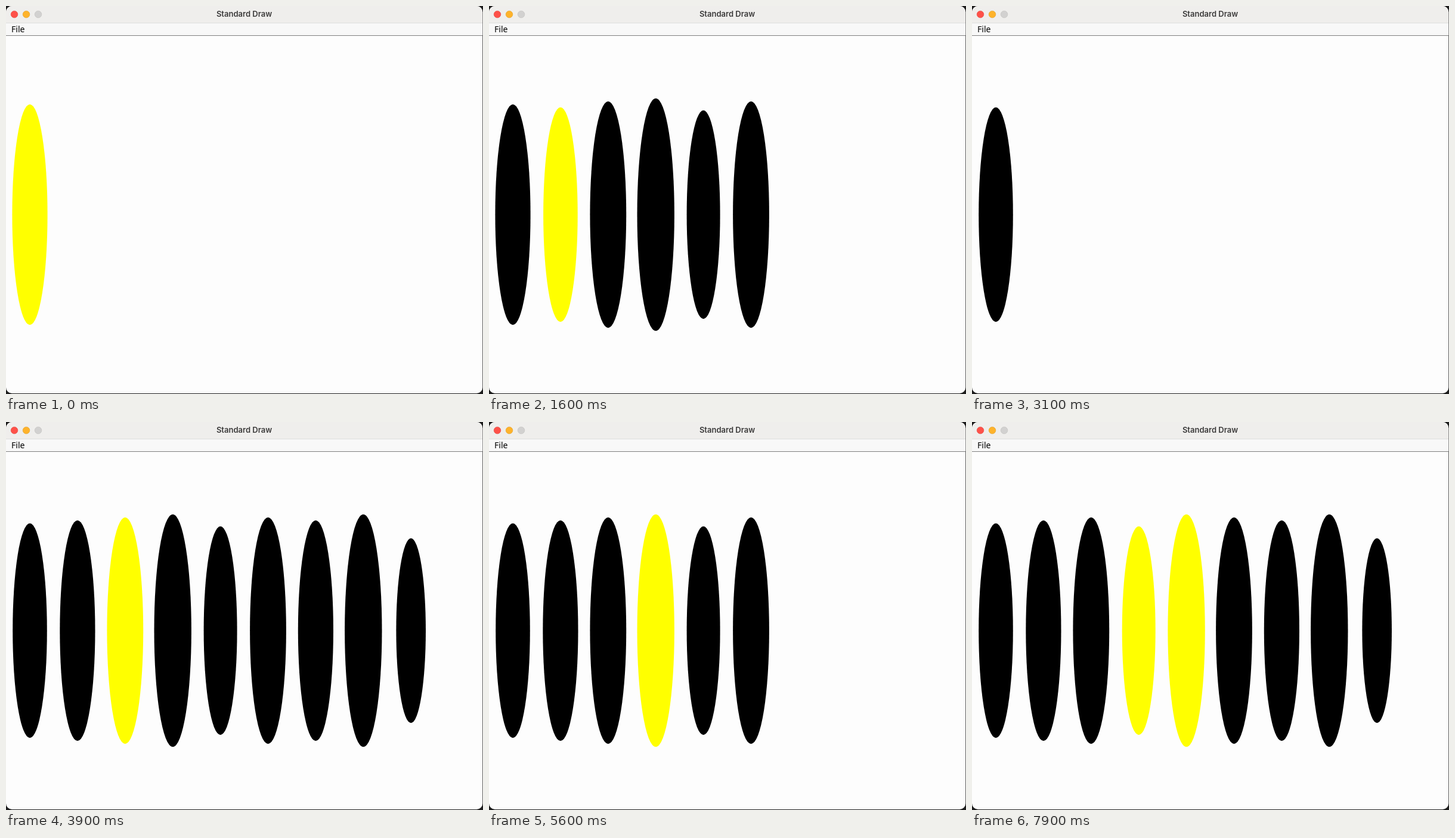
Animation, 800 px wide and 650 px high, one loop 8000 ms. Source, as an HTML page:

```html
<!DOCTYPE html>
<html lang="en">
<head>
<meta charset="utf-8">
<title>Merge sort bars</title>
<style>
  html, body { margin: 0; width: 100%; height: 100%; overflow: hidden; background: #1c1c1c; }
  svg { display: block; }
  .title { font: 600 13px Inter, sans-serif; fill: #3b3a3a; }
  .menu { font: 500 14px "Noto Sans", "Open Sans", sans-serif; fill: #000; }
</style>
</head>
<body>
<svg width="800" height="650" viewBox="0 0 800 650">
  <clipPath id="window"><rect width="799.3" height="649" rx="10"/></clipPath>
  <g clip-path="url(#window)">
    <rect width="800" height="650" fill="#fdfdfd"/>
    <rect width="800" height="28" fill="#efeeec"/>
    <rect y="28" width="800" height="1" fill="#dededd"/>
    <rect y="29" width="800" height="20" fill="#f8f8f8"/>
    <rect y="49" width="800" height="1" fill="#808080"/>
    <g stroke-width=".6">
      <circle cx="14" cy="14" r="5.8" fill="#fe5149" stroke="#e2463f"/>
      <circle cx="34" cy="14" r="5.8" fill="#feb32b" stroke="#e09c24"/>
      <circle cx="54" cy="14" r="5.8" fill="#d2d1d0" stroke="#bfbebd"/>
    </g>
    <text class="title" x="399.5" y="18" text-anchor="middle">Standard Draw</text>
    <text class="menu" x="9" y="44">File</text>
    <g id="bars"></g>
  </g>
</svg>
<script>
const LOOP = 8000, TICK = 100;
const start = [37, 36, 38, 39, 35, 38, 37, 39, 31, 33];
const count = start.length;

// Every sorted range [lo, hi] becomes one pass over the bars.
const passes = [];
function mergeSort(a, lo, hi) {
  if (lo < hi) {
    const mid = (lo + hi) >> 1;
    mergeSort(a, lo, mid);
    mergeSort(a, mid + 1, hi);
    const part = a.slice(lo, hi + 1).sort((x, y) => x - y);
    a.splice(lo, part.length, ...part);
  }
  passes.push({ values: [...a], lo, hi });
}
mergeSort([...start], 0, count - 1);

const group = document.getElementById("bars");
const bars = start.map((_, i) => {
  const bar = document.createElementNS("http://www.w3.org/2000/svg", "ellipse");
  bar.setAttribute("cx", 40 + 79.9 * i);
  bar.setAttribute("cy", 349.5);
  return group.appendChild(bar);
});

function draw(now) {
  // The first bar holds for one extra tick at the start of the loop.
  const step = Math.max(0, Math.floor((now % LOOP) / TICK) - 1);
  const { values, lo, hi } = passes[Math.floor(step / count)];
  const last = step % count;
  bars.forEach((bar, i) => {
    bar.setAttribute("rx", 0.8 * values[i]);
    bar.setAttribute("ry", 5 * values[i] - 0.3);
    bar.setAttribute("fill", i >= lo && i <= hi ? "#ffff00" : "#000");
    bar.setAttribute("visibility", i <= last ? "visible" : "hidden");
  });
}

const begin = performance.now();
function frame() {
  draw(performance.now() - begin);
  requestAnimationFrame(frame);
}
frame();
</script>
</body>
</html>
```
